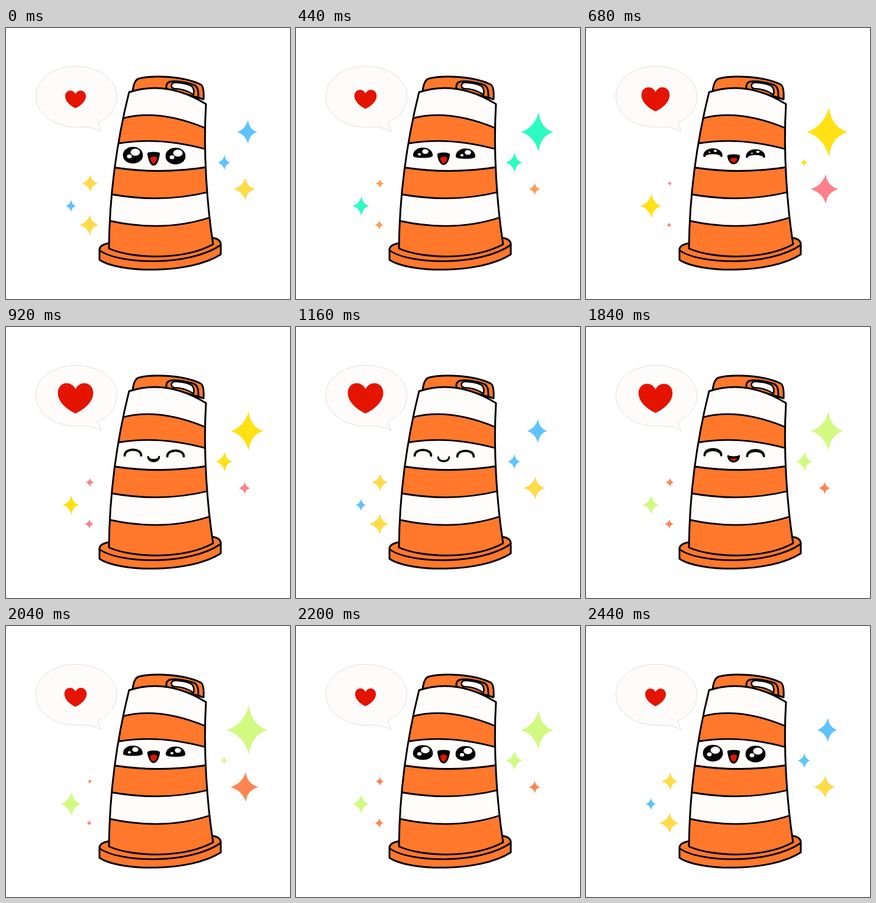
Write an HTML page with a canvas that moves like this. It is 480x456 px and loops after 2640 ms.

```html
<!DOCTYPE html>
<html>
<head>
<meta charset="utf-8">
<style>
html, body { margin: 0; width: 100%; height: 100%; overflow: hidden; background: #fff; }
canvas { display: block; }
</style>
</head>
<body>
<canvas id="stage" width="480" height="456"></canvas>
<script>
const ctx = document.getElementById('stage').getContext('2d');
const ORANGE = '#ff782b', WHITE = '#fffdfc', RED = '#e51400';
const LOOP = 2640, STEPS = 16;

const BODY = 'M208 108C190 180 175 270 174 371C215 389 300 391 350 364C340 300 333 210 338 128Q272 87 208 108Z';
const BASE = 'M174 362Q158 365 158 373V390C190 412 310 415 363 381V363Q362 355 349 353Z';
const BASE_EDGE = 'M158 374C190 398 310 402 363 365';
const CAP = 'M214 107Q216 87 225 85C250 79 300 81 329 95Q335 98 334 120L300 110Z';
const HANDLE = 'M271 102Q270 91 279 90C292 89 309 92 318 96Q326 99 325 117';
const HOLE = 'M280 95Q282 91 290 92Q306 93 314 98Q319 103 317 112Q301 102 284 102Q278 100 280 95Z';
const BUBBLE = 'M130 166.5C92 171 50 150 50.5 114C51 84 84 64 119 64.5C158 65 188 87 187.5 116C187 135 176 150 155 159L160.5 174.5Q145 166 130 166.5Z';
const HEART = 'M0 .425C-.18 .35 -.5 .13 -.5 -.15C-.5 -.45 -.14 -.53 0 -.26C.14 -.53 .5 -.45 .5 -.15C.5 .13 .18 .35 0 .425Z';

// Heights of the stripe borders: left, middle, right
const BORDERS = [[152, 148, 168], [194, 190.8, 204], [235, 240.5, 234], [280, 286.5, 276], [324, 333, 319]];

// Sparkles: x, y, width, and width factor when half and fully lit
const COOL = [[407.5, 175, 34, 1.62, 2.03], [368.5, 226.5, 21, 1.3, .53], [109.5, 299.5, 17, 1.6, 2.05]];
const WARM = [[403, 271, 37, .52, 1.28], [141.5, 261.5, 28, .5, .25], [140.5, 331.5, 33, .45, .25]];
const REST = ['#5fc3ff', '#ffdb49'], MINT = ['#2cfcc4', '#ff9d54'];
const SUN = ['#ffe114', '#ff7f8a'], LIME = ['#d2fa82', '#ff8453'];

// moods: steps at which each of the five moods is reached; spark: step at which sparkles light up
const CALM_DOWN = { start: 280, moods: [0, 4, 8, 10, 13], spark: 1, hues: [MINT, SUN, SUN] };
const WAKE_UP = { start: 1560, moods: [3, 6, 7.5, 9, 13], spark: 3, hues: [LIME, LIME, LIME] };

// Steps alternate between 40 and 80 ms
function stepAt(d) {
  return d < 0 ? 0 : Math.min(STEPS, 1 + 2 * Math.floor(d / 120) + (d % 120 >= 40));
}

// Fractional index of x in a rising list
function reached(keys, x) {
  const i = keys.findIndex(k => k > x);
  if (i < 1) return i ? keys.length - 1 : 0;
  return i - 1 + (x - keys[i - 1]) / (keys[i] - keys[i - 1]);
}

const smooth = x => x * x * x * (x * (6 * x - 15) + 10);

function draw(shape, fill, width, stroke = '#000') {
  const p = new Path2D(shape);
  if (fill) { ctx.fillStyle = fill; ctx.fill(p); }
  if (width) { ctx.lineWidth = width; ctx.strokeStyle = stroke; ctx.stroke(p); }
}

function oval(x, y, rx, ry, fill) {
  ctx.fillStyle = fill;
  ctx.beginPath();
  ctx.ellipse(x, y, rx, ry, 0, 0, 7);
  ctx.fill();
}

function inside(shape, paint) {
  ctx.save();
  ctx.clip(new Path2D(shape));
  paint();
  ctx.restore();
}

// Closed shape with a curved top and bottom between two corners at height y
function lens(x, y, r, top, bottom, pinch = 0) {
  const bend = v => y + (v - y) * 4 / 3, q = r * (1 - pinch);
  return `M${x - r} ${y}C${x - r} ${bend(top)} ${x + r} ${bend(top)} ${x + r} ${y}` +
    `C${x + q} ${bend(bottom)} ${x - q} ${bend(bottom)} ${x - r} ${y}Z`;
}

function drawDrum() {
  draw(CAP, ORANGE, 3);
  draw(HANDLE, null, 3);
  draw(HOLE, '#fff', 2.6);
  draw(BASE, ORANGE, 3);
  draw(BASE_EDGE, null, 2.8);
  inside(BODY, () => {
    draw(BODY, WHITE);
    const curves = BORDERS.map(([l, m, r], i) => {
      const x0 = 197 - 6 * i, x1 = 336 + 2 * i;
      return `M0 ${l}H${x0}Q${(524 - (x0 + x1) / 2)} ${2 * m - (l + r) / 2} ${x1} ${r}H480`;
    });
    curves.forEach((c, i) => draw(c + 'V456H0Z', i % 2 ? WHITE : ORANGE, 2.8));
  });
  draw(BODY, null, 3);
}

function drawEye(x, y, mood) {
  const top = y - 12 + 1.2 * mood, open = 24 * (1 - mood / 4) ** 2;
  const shape = lens(x, y + .6 * mood, 15 - .3 * mood, top, top + open);
  const glint = Math.max(0, 1 - mood / 3);
  draw(shape, '#000', 3.8);
  inside(shape, () => {
    oval(x + 4, top + 7 * glint, 8 * glint, 6 * glint, WHITE);
    oval(x - 6, top + 14 * glint, 4 * glint, 3.2 * glint, WHITE);
  });
}

function drawMouth(mood) {
  const top = 210 + mood * mood, bottom = 230 - 1.1 * mood, depth = bottom - top;
  const shape = lens(249.5, 211 + 2 * mood, 9.2, top, bottom, .4 * (1 - mood / 4));
  draw(shape, '#000');
  inside(shape, () => oval(250, bottom - depth * .25, 8, Math.max(0, depth * .45), RED));
  draw(shape, null, 3);
}

function drawHeart(w) {
  ctx.save();
  ctx.translate(117.5, 120);
  ctx.scale(w, w);
  draw(HEART, RED);
  ctx.restore();
}

function drawStar(x, y, w, h, color) {
  const a = w / 2, b = h / 2, p = a * .2, q = b * .2, tip = x + w * .05;
  draw(`M${tip} ${y - b}Q${x + p} ${y - q} ${x + a} ${y}Q${x + p} ${y + q} ${tip} ${y + b}` +
    `Q${x - p} ${y + q} ${x - a} ${y}Q${x - p} ${y - q} ${tip} ${y - b}Z`, color);
}

// Sparkles go half, full, half, four steps each, then rest
function drawSparkles(half, step) {
  const phase = Math.floor((step - half.spark) / 4);
  const hues = half.hues[phase];
  const level = hues ? 2 - Math.abs(phase - 1) : 0;
  [COOL, WARM].forEach((group, g) => group.forEach(([x, y, w, ...factors]) => {
    const size = w * [1, ...factors][level];
    drawStar(x, y, size, size * (g ? 1.04 : 1.2), (hues || REST)[g]);
  }));
}

function render(t) {
  const half = t < WAKE_UP.start ? CALM_DOWN : WAKE_UP;
  const step = stepAt(t - half.start);
  const progress = reached(half.moods, step);
  const mood = half === CALM_DOWN ? progress : 4 - progress;

  ctx.fillStyle = '#fff';
  ctx.fillRect(0, 0, 480, 456);
  ctx.lineJoin = ctx.lineCap = 'round';

  draw(BUBBLE, '#fefcfb', .7, '#d4d0ce');
  drawHeart(35 + 25 * smooth(mood / 4));
  drawDrum();
  drawEye(214.5, 214, mood);
  drawEye(286.5, 215.5, mood);
  drawMouth(mood);
  drawSparkles(half, step);
}

const begin = performance.now();
function tick() {
  render((performance.now() - begin) % LOOP);
  requestAnimationFrame(tick);
}
tick();
</script>
</body>
</html>
```
